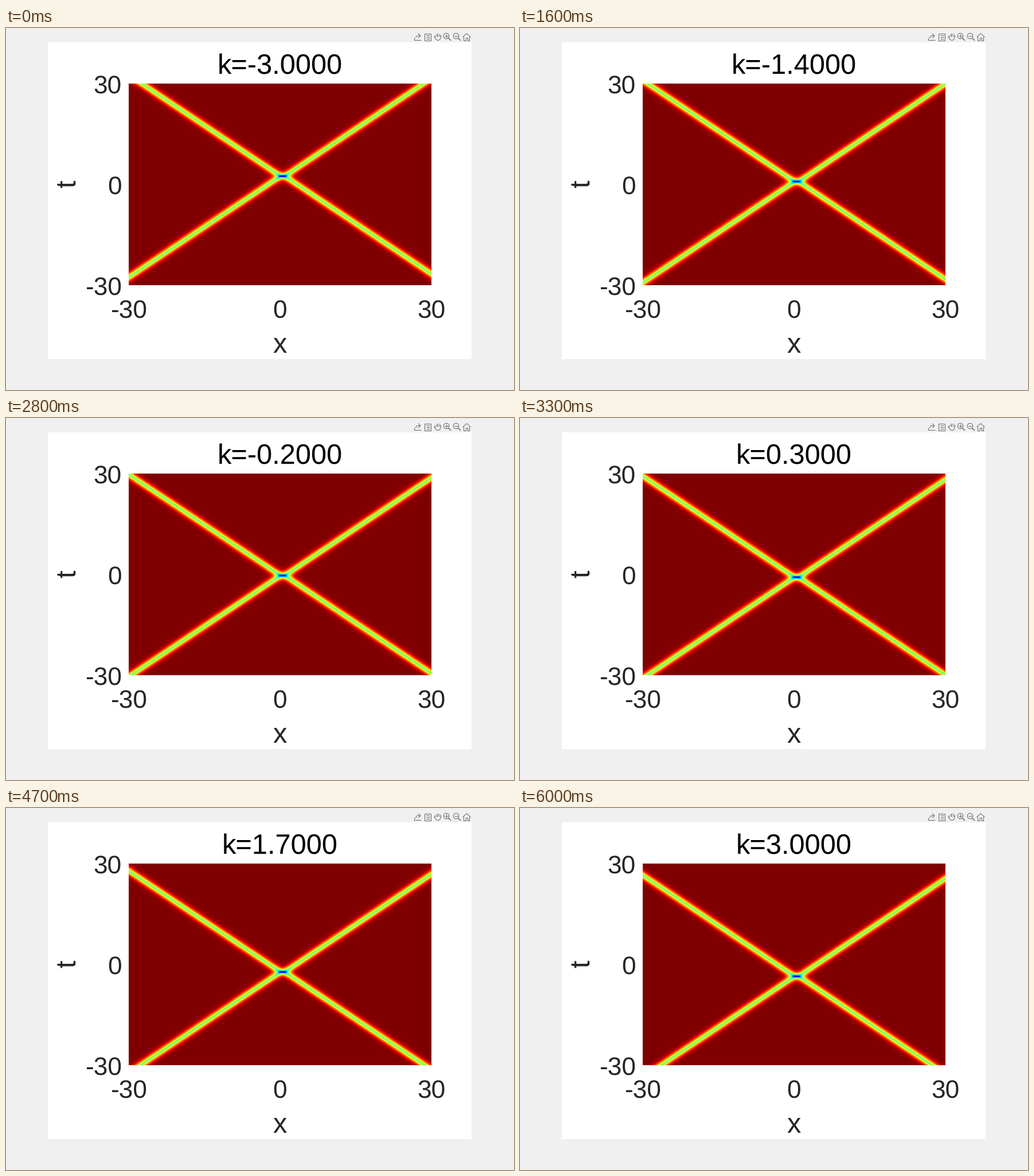
Write a matplotlib script that moves like this. It is 886 by 632 pixels and loops after 6.1 s.

```python
import numpy as np
import matplotlib.pyplot as plt
from matplotlib.animation import FuncAnimation
from matplotlib.patches import Arc, Circle, Rectangle

W, H, DPI = 886, 632, 64
PX = 72 / DPI  # points per pixel
LEFT, RIGHT, TOP, BOTTOM = 214, 742, 97, 449
SPAN = 30
STEPS = 61
TICK_SIZE = 44.3
LABEL_SIZE = 1.1 * TICK_SIZE
INK, ICON = "#262626", "#666666"

plt.rcParams["font.family"] = "Liberation Sans"
plt.rcParams["text.hinting"] = "none"
plt.rcParams["toolbar"] = "None"

fig = plt.figure(figsize=(W / DPI, H / DPI), dpi=DPI, facecolor="#f0f0f0")
ax = fig.add_axes([0, 0, 1, 1])
ax.add_patch(Rectangle((73, 25), 739, 553, fc="white", ec="none", zorder=0))


def centers(n):
    return -SPAN + (np.arange(n) + 0.5) * 2 * SPAN / n


x = centers(RIGHT - LEFT)[None, :]
t = -centers(BOTTOM - TOP)[:, None]


def field(k):
    """Modulus of two colliding dark solitons, each with minimum 1/2."""
    a = np.sqrt(3)
    cx = np.cosh(a * (x - 0.5))
    tau = a * (t + k + 0.55)
    ct = np.cosh(tau)
    return np.hypot(ct - cx, a * np.sinh(tau)) / (2 * ct + cx)


def label(px, py, text, size, color=INK, **kw):
    kw = {"ha": "center", "va": "baseline", **kw}
    return ax.text(px, py, text, fontsize=size * PX, color=color, **kw)


def stroke(*pts, width=1.0):
    xs, ys = zip(*pts)
    ax.plot(xs, ys, color=ICON, lw=width * PX, solid_capstyle="butt")


def outline(patch):
    patch.set(fill=False, edgecolor=ICON, linewidth=PX)
    ax.add_patch(patch)


def export(cx, cy):
    stroke((cx - 6, cy + 1), (cx - 6, cy + 5), (cx + 6, cy + 5))
    stroke((cx - 4, cy + 2), (cx - 1, cy - 2), (cx + 4, cy - 2))
    for side in (-1, 1):
        stroke((cx + 5, cy - 2), (cx + 1, cy - 2 + 4 * side))


def note(cx, cy):
    outline(Rectangle((cx - 5.5, cy - 6), 11, 12))
    for dy in (-3, 0, 3):
        stroke((cx - 3, cy + dy), (cx + 3, cy + dy))


def hand(cx, cy):
    for i in range(5):
        fx = cx - 4 + 2.4 * i
        stroke((fx, cy - 6 + 0.7 * (i - 2) ** 2), (fx, cy))
    outline(Arc((cx + 0.8, cy), 10, 13, theta1=0, theta2=180))
    stroke((cx - 4, cy + 2), (cx - 6, cy))


def magnifier(cx, cy, plus):
    outline(Circle((cx, cy), 4.8))
    stroke((cx + 3.5, cy + 3.5), (cx + 8, cy + 8), width=1.5)
    stroke((cx - 2.7, cy), (cx + 2.7, cy))
    if plus:
        stroke((cx, cy - 2.7), (cx, cy + 2.7))


def home(cx, cy):
    for side in (-1, 1):
        wall, door = cx + 5 * side, cx + 1.7 * side
        stroke((cx, cy - 6), (cx + 7 * side, cy + 0.5))
        stroke((wall, cy - 1), (wall, cy + 6), (door, cy + 6),
               (door, cy + 1), (cx, cy + 1))


export(718, 15.5)
note(736, 15.5)
hand(752.5, 15)
magnifier(768, 14, True)
magnifier(785, 14, False)
home(803.5, 15.5)

mid_x = (LEFT + RIGHT) / 2
title = label(mid_x, 80, "", LABEL_SIZE, "black")
for value in (-SPAN, 0, SPAN):
    frac = value / (2 * SPAN)
    label(mid_x + frac * (RIGHT - LEFT), 507, str(value), TICK_SIZE)
    label(202, 291 - frac * (BOTTOM - TOP), str(value), TICK_SIZE, ha="right")
label(mid_x, 567, "x", LABEL_SIZE)
label(122, 272, "t", LABEL_SIZE, rotation=90, rotation_mode="anchor")

image = ax.imshow(field(-3), cmap="jet", vmin=0, vmax=1, aspect="auto",
                  extent=(LEFT, RIGHT, BOTTOM, TOP), interpolation="nearest",
                  zorder=1)
ax.set_xlim(0, W)
ax.set_ylim(H, 0)
ax.axis("off")


def draw(i):
    k = (i - 30) / 10
    title.set_text(f"k={k:.4f}")
    image.set_data(field(k))
    return title, image


anim = FuncAnimation(fig, draw, frames=STEPS, interval=100, blit=False)
plt.show()
```
